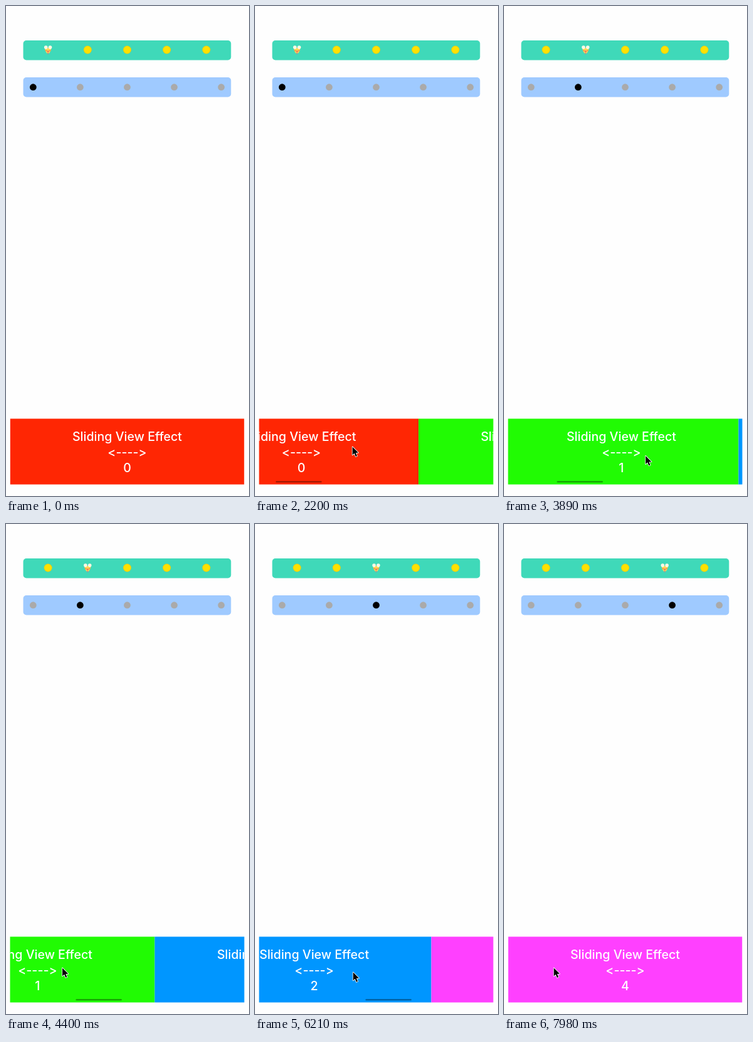
Recreate the animation shown at these times as an HTML page with a canvas. Size 388 by 783 pixels, loop 8000 ms.

```html
<!DOCTYPE html>
<html lang="en">
<head>
<meta charset="utf-8">
<title>Sliding View Effect</title>
<style>
  html, body { margin: 0; width: 100%; height: 100%; overflow: hidden; background: #fefefe; }
  canvas { display: block; width: 388px; height: 783px; }
</style>
</head>
<body>
<canvas id="stage" width="388" height="783"></canvas>
<script>
const ctx = document.getElementById('stage').getContext('2d');
const LOOP = 8000;
const PANEL = { x: 6.5, y: 659.3, w: 374, h: 105.4 };
const FONT = '500 19.6px Inter, Roboto, sans-serif';
const COLORS = ['#ff2603', '#21fb03', '#0096ff', '#ff40ff'];
const LABELS = '0124';

// Timing shared by all swipes, in ms; SLOP is the drag distance lost, in px
const CATCH_UP = 150, SETTLE = 340, BAR_GONE = 600, BAR_FADE = 160, SLOP = 28;

// press: pointer x where the finger goes down
const swipes = [
  { press: 302.5, grab: 1690, release: 2350 },
  { press: 260.5, grab: 3760, release: 4560 },
  { press: 283, grab: 6060, release: 6790 }
];

// Pointer glides: begin, end, and the tip it arrives at
const ENTER = 765;
const glides = [
  [ENTER, 890, 302, 722],
  [1400, 1540, 169, 711],
  [1720, 1840, 155, 704],
  [2208, 2350, 50, 706],
  [2790, 2950, 200, 720],
  [3200, 3600, 260.5, 721],
  [3760, 4560, 47, 706],
  [5420, 5630, 248, 728],
  [5780, 5920, 283, 726],
  [6060, 6330, 56, 708],
  [6560, 6650, 26, 706],
  [7740, 7980, 79, 709]
];

const mix = (a, b, p) => a + (b - a) * p;
const ramp = (t, from, to) => Math.min(1, Math.max(0, (t - from) / (to - from)));
const easeOut = p => 1 - (1 - p) ** 2;

function pointerAt(t) {
  return glides.reduce(([x, y], [begin, end, toX, toY]) => {
    const p = ramp(t, begin, end);
    return [mix(x, toX, p), mix(y, toY, p)];
  }, [384, 706]);
}

// The page follows the pointer, then glides on to the next stop
function swipeOffset({ press, grab, release }, t) {
  if (t < grab) return 0;
  const [x] = pointerAt(Math.min(t, release));
  const dragged = Math.max(0, press - x - SLOP) * ramp(t, grab, grab + CATCH_UP);
  return mix(dragged, PANEL.w, easeOut(ramp(t, release, release + SETTLE)));
}

const scrollAt = t => swipes.reduce((sum, s) => sum + swipeOffset(s, t), 0);
const pageAt = t => swipes.filter(s => t >= s.release + SETTLE).length;

function barAlpha(t) {
  const swipe = swipes.find(s => t >= s.grab && t < s.release + BAR_GONE);
  return swipe ? ramp(t, swipe.release + BAR_GONE, swipe.release + BAR_GONE - BAR_FADE) : 0;
}

function disc(x, y, r, color) {
  ctx.fillStyle = color;
  ctx.beginPath();
  ctx.arc(x, y, r, 0, Math.PI * 2);
  ctx.fill();
}

function pill(x, y, w, h, r, color) {
  ctx.fillStyle = color;
  ctx.beginPath();
  ctx.roundRect(x, y, w, h, r);
  ctx.fill();
}

function coin(x, y) {
  disc(x, y, 6.5, '#f0cd08');
  disc(x, y, 5.7, '#ffe100');
}

function face(x, y) {
  ctx.fillStyle = '#ffd555';
  ctx.beginPath();
  ctx.moveTo(x - 5.2, y - 3);
  ctx.lineTo(x + 5.2, y - 3);
  ctx.quadraticCurveTo(x + 4.6, y + 4, x, y + 7);
  ctx.quadraticCurveTo(x - 4.6, y + 4, x - 5.2, y - 3);
  ctx.fill();
  for (const side of [-1, 1]) {
    disc(x + side * 3.4, y - 3.9, 2.8, '#fff8e4');
    disc(x + side * 3, y + 1.2, 1.2, '#f5a04a');
  }
  disc(x, y + 2.6, 1.6, '#ee7a62');
  disc(x, y + 6, 1.2, '#9c94a0');
}

function indicators(active) {
  pill(27.5, 55, 331.8, 31.5, 5, '#3fd9b9');
  pill(27.5, 114, 331.8, 31.5, 5, '#9fcaff');
  for (let i = 0; i < 5; i++) {
    (i === active ? face : coin)(67.1 + i * 63.2, 70);
    disc(43.3 + i * 75.1, 129.7, 5.4, i === active ? '#000' : '#aaa');
  }
}

// Drawn glyph by glyph so the font does not join it into an arrow
function dashes(cx, y) {
  const glyphs = [...'<---->'];
  const widths = glyphs.map(g => ctx.measureText(g).width);
  let x = cx - widths.reduce((a, b) => a + b) / 2;
  glyphs.forEach((g, i) => {
    ctx.fillText(g, x + widths[i] / 2, y);
    x += widths[i];
  });
}

function panel(offset, alpha) {
  const { x, y, w, h } = PANEL;
  ctx.save();
  ctx.beginPath();
  ctx.rect(x, y, w, h);
  ctx.clip();
  ctx.font = FONT;
  ctx.textAlign = 'center';
  COLORS.forEach((color, i) => {
    const left = x + i * w - offset;
    if (left >= x + w || left + w <= x) return;
    const cx = left + w / 2;
    ctx.fillStyle = color;
    ctx.fillRect(left, y, w, h);
    ctx.fillStyle = '#fff';
    ctx.fillText('Sliding View Effect', cx, 694.5);
    dashes(cx, 720);
    ctx.fillText(LABELS[i], cx, 744.6);
  });
  if (alpha) pill(9.6 + offset * 0.197, 759, 73.4, 2.5, 1.25, `rgba(0,0,0,${0.35 * alpha})`);
  ctx.restore();
}

function pointer(t) {
  if (t < ENTER) return;
  const [x, y] = pointerAt(t);
  ctx.save();
  ctx.translate(x + 0.6, y + 0.4);
  ctx.scale(0.9, 0.9);
  const arrow = new Path2D('M0 0V14.6L3.3 11.5 5.8 17.2 8.2 16.2 5.8 10.6 10.4 10.5Z');
  ctx.lineJoin = 'round';
  ctx.lineWidth = 1.8;
  ctx.strokeStyle = '#fff';
  ctx.stroke(arrow);
  ctx.fillStyle = '#000';
  ctx.fill(arrow);
  ctx.restore();
}

function draw(t) {
  ctx.fillStyle = '#fefefe';
  ctx.fillRect(0, 0, 388, 783);
  indicators(pageAt(t));
  panel(scrollAt(t), barAlpha(t));
  pointer(t);
}

const start = performance.now();
function tick() {
  draw((performance.now() - start) % LOOP);
  requestAnimationFrame(tick);
}
tick();
</script>
</body>
</html>
```
